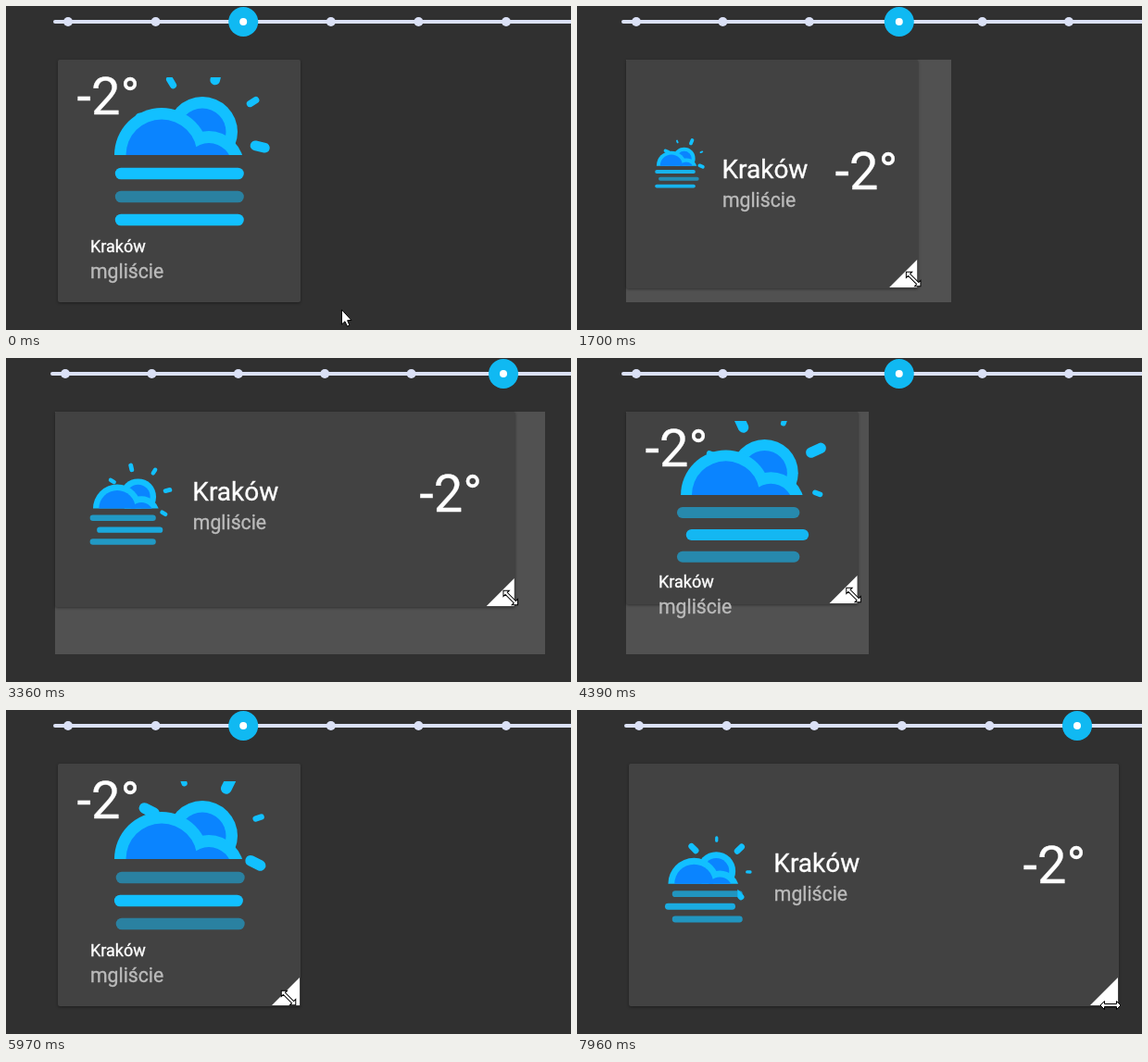
Recreate the animation shown at these times as an HTML page with a canvas. Size 610 by 350 pixels, loop 8000 ms.

```html
<!DOCTYPE html>
<html lang="pl">
<head>
<meta charset="utf-8">
<title>Weather widget resize</title>
<style>
  html, body { margin: 0; width: 100%; height: 100%; overflow: hidden; background: #303030; }
  canvas { display: block; }
</style>
</head>
<body>
<canvas id="stage" width="610" height="350"></canvas>
<script>
const ctx = document.getElementById('stage').getContext('2d');
const LOOP = 8000, TAU = Math.PI * 2, TOP = 58, THUMB_LAG = 80;
const LIGHT = '#12c0ff', DEEP = '#0a84ff', TRACK = '#dbe1f6';

// Turning points of the card: [time, width, height].
const sizes = [
  [1000, 262, 262], [1700, 315, 247], [2800, 512, 211], [3360, 497, 211], [4390, 251, 208],
  [4800, 80, 212], [5450, 262, 262], [5990, 262, 262], [6730, 447, 211], [7150, 529, 262]
];
// While dragging, the pointer hangs on the card's corner.
const drags = [
  { from: 1000, to: 5450, dx: -5, dy: -10 },
  { from: 5990, to: 7150, dx: -11, dy: -9 }
];
// Otherwise it moves freely: [time, x, y].
const pointerStops = [
  [0, 362, 328], [790, 311, 311], [5450, 307, 311], [5650, 322, 323],
  [5950, 305, 311], [5990, 305, 311], [7150, 571, 311], [7300, 580, 328], [7500, 576, 319]
];

function sample(rows, t) {
  const next = rows.findIndex(row => row[0] > t);
  if (next < 0) return rows[rows.length - 1].slice(1);
  if (next === 0) return rows[0].slice(1);
  const a = rows[next - 1], b = rows[next];
  const k = (t - a[0]) / (b[0] - a[0]);
  return a.slice(1).map((v, i) => v + (b[i + 1] - v) * k);
}

const clamp = (v, low, high) => Math.max(low, Math.min(high, v));
const columnAt = w => clamp(Math.ceil((w - 84) / 89), 0, 5);

function disc(x, y, r, color) {
  ctx.fillStyle = color;
  ctx.beginPath();
  ctx.arc(x, y, r, 0, TAU);
  ctx.fill();
}

function roundBox(x, y, w, h, r) {
  ctx.beginPath();
  ctx.roundRect(x, y, w, h, r);
  ctx.fill();
}

function polygon(points, fill, stroke) {
  ctx.beginPath();
  points.forEach(([x, y]) => ctx.lineTo(x, y));
  ctx.closePath();
  ctx.fillStyle = fill;
  ctx.fill();
  if (stroke) { ctx.strokeStyle = stroke; ctx.lineWidth = 1; ctx.stroke(); }
}

// The thin outline gives the slightly heavier look of hinted screen text.
function text(str, x, y, size, color) {
  ctx.font = `400 ${size}px Roboto, sans-serif`;
  ctx.fillStyle = ctx.strokeStyle = color;
  ctx.lineWidth = 0.35;
  ctx.fillText(str, x, y);
  ctx.strokeText(str, x, y);
}

function drawSlider(dragging, column) {
  const start = dragging ? 64 : 67, gap = dragging ? 93.4 : 94.6;
  ctx.fillStyle = TRACK;
  roundBox(start - 16, 15, 640, 4, 2);
  for (let i = 0; i < 6; i++) disc(start + gap * i, 17, 5, TRACK);
  const x = start + 94.6 * column;
  disc(x, 17, 16, '#10b9f2');
  disc(x, 17, 4, '#fff');
}

function drawRays(t) {
  const pulse = clamp(1.6 * Math.cos((t - 5000) / 6200 * TAU), -1, 1);
  ctx.save();
  // The sun shows above the cloud's base and to the right of it.
  ctx.beginPath();
  ctx.rect(-60, -120, 400, 120);
  ctx.rect(137, -1, 200, 200);
  ctx.clip();
  ctx.translate(95, -24);
  ctx.rotate((13.5 + t * 0.0323) * Math.PI / 180);
  ctx.fillStyle = LIGHT;
  for (let i = 0; i < 8; i++) {
    const k = i % 2 ? -pulse : pulse;
    const length = 18 + 6 * k, width = 9 + 3 * k;
    roundBox(64 - length / 2, -width / 2, length, width, width / 2);
    ctx.rotate(TAU / 8);
  }
  ctx.restore();
}

function drawCloud() {
  ctx.save();
  ctx.beginPath();
  ctx.rect(-5, -110, 200, 110);
  ctx.clip();
  disc(95, -25, 38, LIGHT);
  disc(95, -25, 25.5, DEEP);
  disc(51, 0, 51, LIGHT);
  disc(102, 12, 38, LIGHT);
  disc(51, 0, 38.5, DEEP);
  disc(102, 12, 25, DEEP);
  ctx.restore();
}

function drawFog(t) {
  const phase = t / 5750 * Math.PI;
  ctx.fillStyle = LIGHT;
  for (let i = 0; i < 3; i++) {
    const side = i === 1 ? -1 : 1;
    ctx.globalAlpha = 0.75 + 0.25 * side * Math.cos(phase);
    roundBox(0.8 - side * 7.6 * Math.sin(phase), 13.7 + 25 * i, 139, 12.6, 6.3);
  }
}

// The icon's origin is the bottom left corner of the cloud.
function drawIcon(x, y, scale, t, cropped) {
  ctx.save();
  ctx.translate(x, y);
  ctx.scale(scale, scale);
  if (cropped) {
    ctx.beginPath();
    ctx.rect(-60, -84, 400, 400);
    ctx.clip();
  }
  drawRays(t);
  drawCloud();
  drawFog(t);
  ctx.restore();
}

function drawStacked(x, w, h, t) {
  const scale = (w - 20) / 242;
  const base = TOP + 19 + (h - 262) / 6 + 84 * scale;
  const nameY = base + 105 * scale;
  drawIcon(x + 20 + 41 * scale, base, scale, t, true);
  text('-2°', x + 20.5, 117, 56, '#fff');
  text('Kraków', x + 35, nameY, 18, '#fff');
  text('mgliście', x + 35, nameY + 28, 21.2, '#bbb');
}

function drawRow(x, w, h, t) {
  const scale = (w - 27) / 918;
  const rowTop = TOP + h / 2 - Math.max(247 * scale, 98) / 2;
  const nameX = x + 32.2 + 227 * scale, nameY = rowTop + 53.5;
  drawIcon(x + 20 + 41 * scale, rowTop + 5 + 112 * scale, scale, t, false);
  text('Kraków', nameX, nameY, 28, '#fff');
  text('mgliście', nameX + 0.5, nameY + 31, 21.2, '#bbb');
  text('-2°', Math.max(x + w - 103.5, nameX + 122), nameY + 12, 56, '#fff');
}

function drawCard(x, w, h) {
  ctx.save();
  ctx.shadowColor = 'rgba(0,0,0,.4)';
  ctx.shadowBlur = 3;
  ctx.shadowOffsetY = 1;
  ctx.fillStyle = '#424242';
  roundBox(x, TOP, w, h, 2);
  ctx.restore();
}

function drawPointer(x, y, kind) {
  ctx.save();
  ctx.translate(x, y);
  if (kind === 'arrow') {
    polygon([[0.5, 0], [0.5, 16], [4, 12.8], [6.5, 18], [9, 17], [6.7, 11.7], [11, 11.5]], '#fff', '#000');
  } else {
    if (kind === 'corner') ctx.rotate(Math.PI / 4);
    const half = [[-11, 0], [-6.5, -4.5], [-6.5, -1.5], [6.5, -1.5], [6.5, -4.5]];
    polygon([...half, ...half.map(([px, py]) => [-px, -py])], '#fff', '#000');
  }
  ctx.restore();
}

function draw(t) {
  const drag = drags.find(d => t >= d.from && t < d.to);
  const x = drag ? 53 : 56;
  const [w, h] = sample(sizes, t);
  const [oldWidth] = sample(sizes, t - THUMB_LAG);
  const right = x + w, bottom = TOP + h;
  const [px, py] = drag ? [right + drag.dx, bottom + drag.dy] : sample(pointerStops, t);
  const outside = px > right || py > bottom;
  const kind = outside ? 'arrow' : py > bottom - 2 ? 'side' : 'corner';

  ctx.fillStyle = '#303030';
  ctx.fillRect(0, 0, 610, 350);
  drawSlider(drag, columnAt(oldWidth));
  if (drag) {
    ctx.fillStyle = '#515151';
    ctx.fillRect(x, TOP, 84 + 89 * columnAt(w), 262);
  }
  drawCard(x, w, h);
  (w <= 262 ? drawStacked : drawRow)(x, w, h, t);
  if (!outside) {
    polygon([[right - 1, bottom - 31], [right - 1, bottom - 1], [right - 31, bottom - 1]], '#fff');
  }
  drawPointer(px, py, kind);
}

const began = performance.now();
function tick() {
  draw((performance.now() - began) % LOOP);
  requestAnimationFrame(tick);
}
tick();
</script>
</body>
</html>
```
